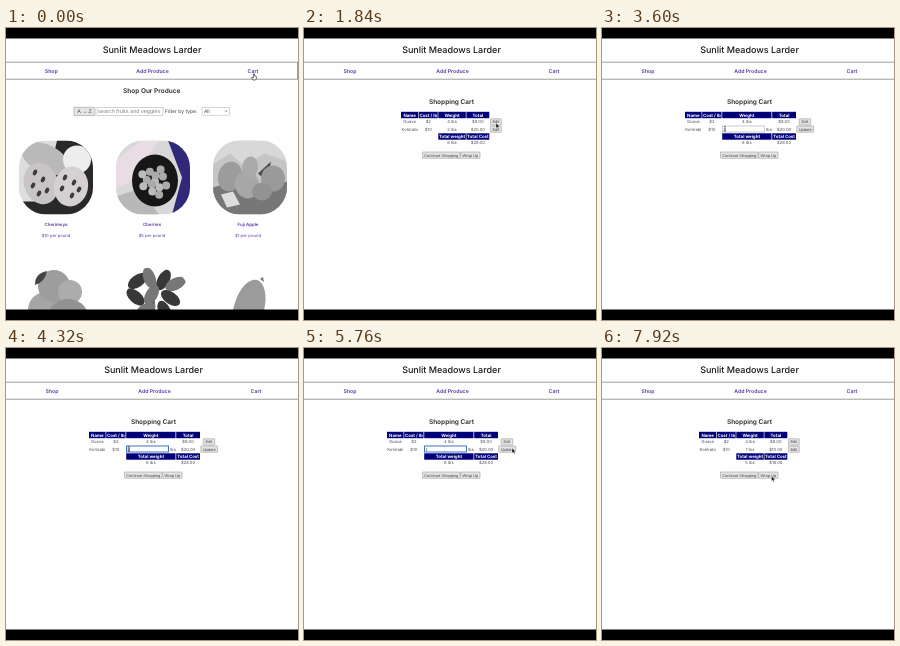
Recreate the animation shown at these times as an HTML page. Size 292 by 292 pixels, loop 8 s.

```html
<!DOCTYPE html>
<html lang="en">
<head>
<meta charset="utf-8">
<title>Produce shop</title>
<style>
html, body { margin: 0; width: 100%; height: 100%; overflow: hidden; background: #fff; }
svg { display: block; width: 100vw; height: 100vh; }
text { font-family: Inter, "Open Sans", sans-serif; text-rendering: geometricPrecision; }
.ui { font-family: "Liberation Sans", Arial, sans-serif; }
</style>
</head>
<body>
<svg id="stage" viewBox="0 0 292 292">
  <defs>
    <clipPath id="page"><rect y="10" width="292" height="272"/></clipPath>
    <clipPath id="search"><rect x="91.5" y="79" width="65" height="9"/></clipPath>
    <clipPath id="photo"><rect width="74" height="74" rx="27"/></clipPath>
  </defs>
  <rect width="292" height="292" fill="#fefefe"/>
  <g id="view" clip-path="url(#page)"></g>
  <path d="M0 0H292V10.5H0ZM0 281.5H292V292H0Z"/>
  <g id="pointer"></g>
</svg>
<script>
const LOOP = 8000;
const TITLE = 'Sunlit Meadows Larder';
const PURPLE = '#5a36a3', NAVY = '#000078', INK = '#505050';
const view = document.getElementById('view');
const pointer = document.getElementById('pointer');

const text = (s, x, y, size, fill = INK, weight = 400, anchor = 'middle', cls = '') =>
  `<text x="${x}" y="${y}" font-size="${size}" fill="${fill}" font-weight="${weight}" text-anchor="${anchor}" class="${cls}">${s}</text>`;
const rect = (x, y, w, h, fill, extra = '') =>
  `<rect x="${x}" y="${y}" width="${w}" height="${h}" fill="${fill}" ${extra}/>`;
const dot = (x, y, r, fill) => `<circle cx="${x}" cy="${y}" r="${r}" fill="${fill}"/>`;
const oval = (x, y, rx, ry, turn, fill) =>
  `<ellipse cx="${x}" cy="${y}" rx="${rx}" ry="${ry}" fill="${fill}" transform="rotate(${turn} ${x} ${y})"/>`;
const path = (d, fill) => `<path d="${d}" fill="${fill}"/>`;
const button = (s, x, y, w, h = 6.3, size = 4) =>
  rect(x, y, w, h, '#e4e4e4', 'stroke="#8c8c8c" stroke-width=".5" rx=".5"') +
  text(s, x + w / 2, y + h / 2 + size * .35, size, '#444', 400, 'middle', 'ui');

function header(mid, links) {
  const names = ['Shop', 'Add Produce', 'Cart'];
  return text(TITLE, mid, 25.3, 9, '#181818', 500) +
    rect(0, 33.8, 292, .7, '#777') + rect(0, 50.8, 292, .7, '#777') +
    names.map((s, i) => text(s, links[i], 44.9, 5.2, PURPLE, 600)).join('');
}

// Simple stand-ins for the produce photos, each on a 74 x 74 tile
function cherimoya() {
  const seeds = [[16, 32], [24, 39], [14, 45], [28, 50], [20, 53], [46, 37], [55, 42], [43, 48], [53, 55], [60, 49]];
  return rect(0, 0, 74, 74, '#ddd') + path('M38 0H74V74H0V61H24Z', '#292929') +
    oval(26, 18, 25, 14, 25, '#b9b9b9') + oval(58, 19, 14, 14, 0, '#ededed') +
    oval(22, 43, 17, 21, -18, '#c9c5c6') + oval(52, 46, 17, 20, 12, '#d5d1d3') +
    seeds.map(([x, y]) => oval(x, y, 2, 3, 25, '#3c3c3c')).join('');
}
function cherries() {
  let fruit = '';
  for (let i = 0; i < 13; i++) {
    const a = i * 2.4, r = 4.2 * Math.sqrt(i);
    fruit += dot(39 + r * Math.cos(a), 41 + r * Math.sin(a), 4, i % 3 ? '#aaa' : '#bcbcbc');
  }
  return rect(0, 0, 74, 74, '#d9d8d8') + path('M0 20L25 0H43L13 42L0 48Z', '#eadce5') +
    path('M52 0H74V74H56L66 37Z', '#302878') + path('M0 56L24 48L43 74H0Z', '#b8b8b8') +
    oval(39, 40, 23, 26, 0, '#171717') + fruit;
}
function apples() {
  return rect(0, 0, 74, 74, '#c5c5c5') + path('M0 0H74V21L52 13L31 25L17 13L0 24Z', '#d8d8d8') +
    path('M0 47L24 40L46 52L74 41V74H0Z', '#777') +
    path('M29 40L36 17L43 38ZM45 33L58 21L54 41Z', '#4a4a4a') +
    oval(17, 36, 12, 15, 15, '#9c9c9c') + oval(34, 44, 12, 14, -12, '#a7a7a7') +
    oval(60, 38, 12, 13, 0, '#9a9a9a') + oval(37, 27, 8, 11, 8, '#aaa') +
    oval(49, 51, 10, 9, 0, '#929292') + path('M8 54L20 51L27 64L14 67Z', '#ddd');
}
function peaches() {
  return dot(26, 42, 18, '#a5a5a5') + dot(34, 18, 16, '#9d9d9d') + dot(50, 24, 12, '#acacac') +
    oval(48, 46, 19, 15, 0, '#929292') + path('M15 17Q15 5 27 3Q25 14 15 17Z', '#444');
}
function leaves() {
  return path('M35 49L38 5L40 49Z', '#555') +
    [[22, 13, 55], [34, 10, -20], [48, 12, 28], [60, 16, 65], [20, 29, -48], [36, 27, 30], [55, 30, -55], [30, 42, 60], [49, 43, -25]]
      .map(([x, y, a], i) => oval(x, y, 6, 11, a, i % 2 ? '#777' : '#383838')).join('');
}
const mango = () => oval(38, 40, 15, 29, 16, '#9b9b9b') + path('M49 11L52 9L53 14Z', '#777');

function shop() {
  const tile = (art, x, y) => `<g transform="translate(${x} ${y})"><g clip-path="url(#photo)">${art}</g></g>`;
  const cards = [['Cherimoya', 10, cherimoya], ['Cherries', 5, cherries], ['Fuji Apple', 1, apples]];
  return header(146, [45.3, 146.5, 247]) + rect(291, 34, .7, 17, '#777') +
    text('Shop Our Produce', 145.7, 64.6, 6.5, '#292929', 600) +
    button('A → Z', 68, 79.3, 21, 8.3, 5.2) +
    rect(91, 79.3, 66, 8.3, '#fff', 'stroke="#aaa" stroke-width=".5"') +
    `<g clip-path="url(#search)">${text('search fruits and veggies', 92, 85.3, 5.6, '#888', 400, 'start', 'ui')}</g>` +
    text('Filter by type:', 159, 85.2, 5, '#454545', 400, 'start') +
    rect(196, 79.5, 27.5, 7.8, '#fff', 'stroke="#aaa" stroke-width=".5" rx=".6"') +
    text('All', 198, 85.2, 5, '#444', 400, 'start', 'ui') +
    '<path d="M219 82.5l1.2 1.4 1.2-1.4" fill="none" stroke="#555" stroke-width=".6"/>' +
    cards.map(([name, price, art], i) => {
      const x = 50 + i * 96;
      return tile(art(), x - 37 + i, 112.5) + text(name, x, 197.6, 4.4, PURPLE, 600) +
        text(`$${price} per pound`, x, 209.2, 4.2, PURPLE);
    }).join('') +
    [peaches, leaves, mango].map((art, i) => tile(art(), 14 + i * 95.5, 240)).join('');
}

function cart(editing, qty, focused) {
  const saved = editing ? 2 : qty;
  const cols = editing
    ? [[83, 99.6], [100.2, 119.5], [120.2, 169.5], [170.2, 194]]
    : [[97, 114.3], [114.9, 133.7], [134.3, 161.8], [162.4, 185.3]];
  const mid = cols.map(([a, b]) => (a + b) / 2);
  const head = (s, i, y) => rect(cols[i][0], y, cols[i][1] - cols[i][0], 6.4, NAVY) +
    text(s, mid[i], y + 4.8, 4.4, '#fff', 700);
  const row = (cells, y) => cells.map((s, i) => s ? text(s, mid[i], y, 4.2) : '').join('');
  const field = rect(120.5, 98, 42, 6, '#fff', focused
    ? 'stroke="#3f74bd" stroke-width="1"' : 'stroke="#999" stroke-width=".5"') +
    (focused && qty === 2 ? rect(121.4, 98.8, 2.7, 4.4, '#afcef5') : '') +
    text(qty, 121.6, 102.5, 4, '#333', 400, 'start', 'ui') + text('lbs', 167, 102.8, 4.2);

  return header(147.5, [46, 148.5, 250]) +
    text('Shopping Cart', 147.5, 76.2, 6.5, '#292929', 600) +
    ['Name', 'Cost / lb', 'Weight', 'Total'].map((s, i) => head(s, i, 83.8)).join('') +
    row(['Guava', '$2', '4 lbs', '$8.00'], 95.4) +
    row(['Kohlrabi', '$10', editing ? '' : `${saved} lbs`, `$${saved * 10}.00`], 102.9) +
    (editing ? field : '') +
    head('Total weight', 2, 105.3) + head('Total Cost', 3, 105.3) +
    row(['', '', `${saved + 4} lbs`, `$${saved * 10 + 8}.00`], 116.2) +
    (editing ? button('Edit', 197.2, 90.8, 11.5) + button('Update', 194.8, 98, 16.8)
      : button('Edit', 186.5, 90.8, 10.8) + button('Edit', 186.5, 98, 10.8)) +
    button('Continue Shopping', 118.5, 124, 37.5) + button('Wrap Up', 156.6, 124, 19.4);
}

// Each screen holds from its start time until the next
const screens = [
  [0, shop()], [400, cart(false, 2)], [2560, cart(true, 2)],
  [3680, cart(true, 2, true)], [4720, cart(true, 1, true)], [6240, cart(false, 1)]
];

const moves = [
  [0, 248, 46], [960, 248, 46], [1360, 185, 122], [1760, 192, 95], [1900, 192, 95],
  [2320, 191.5, 101.5], [2960, 191.5, 101.5], [3280, 160, 110], [3600, 123, 101],
  [4640, 123, 101], [5040, 160, 113], [5520, 208, 100], [6320, 208, 100],
  [7040, 169.5, 128], [8000, 169.5, 128]
];
const shapes = {
  hand: '<path d="M-.6 0Q0-.9.6 0V2L2.4 2.5V4.5L1.6 6H-1L-2.5 3.7Q-2.3 2.8-.6 3.8Z" fill="#fff" stroke="#222" stroke-width=".65"/>',
  arrow: '<path d="M0 0V5.2L1.2 4.1 2.1 6 3 5.6 2.1 3.8H3.7Z" fill="#111" stroke="#fff" stroke-width=".4"/>',
  beam: '<path d="M-.9-2.4H.9M0-2.4V2.4M-.9 2.4H.9" fill="none" stroke="#333" stroke-width=".55"/>'
};

function cursorAt(t) {
  const i = Math.max(1, moves.findIndex(m => m[0] > t));
  const [t0, x0, y0] = moves[i - 1], [t1, x1, y1] = moves[i];
  const p = (t - t0) / (t1 - t0), e = p * p * (3 - 2 * p);
  return [x0 + (x1 - x0) * e, y0 + (y1 - y0) * e];
}

let shown = -1, kind = '';
function draw(now) {
  const t = Math.floor((now % LOOP) / 80) * 80;
  const next = screens.findLastIndex(s => s[0] <= t);
  if (next !== shown) view.innerHTML = screens[shown = next][1];
  const shape = t < 1040 ? 'hand' : t >= 3440 && t < 4800 ? 'beam' : 'arrow';
  if (shape !== kind) pointer.innerHTML = shapes[kind = shape];
  pointer.setAttribute('transform', `translate(${cursorAt(t).join(' ')})`);
}
const start = performance.now();
function frame() {
  draw(performance.now() - start);
  requestAnimationFrame(frame);
}
frame();
</script>
</body>
</html>
```
